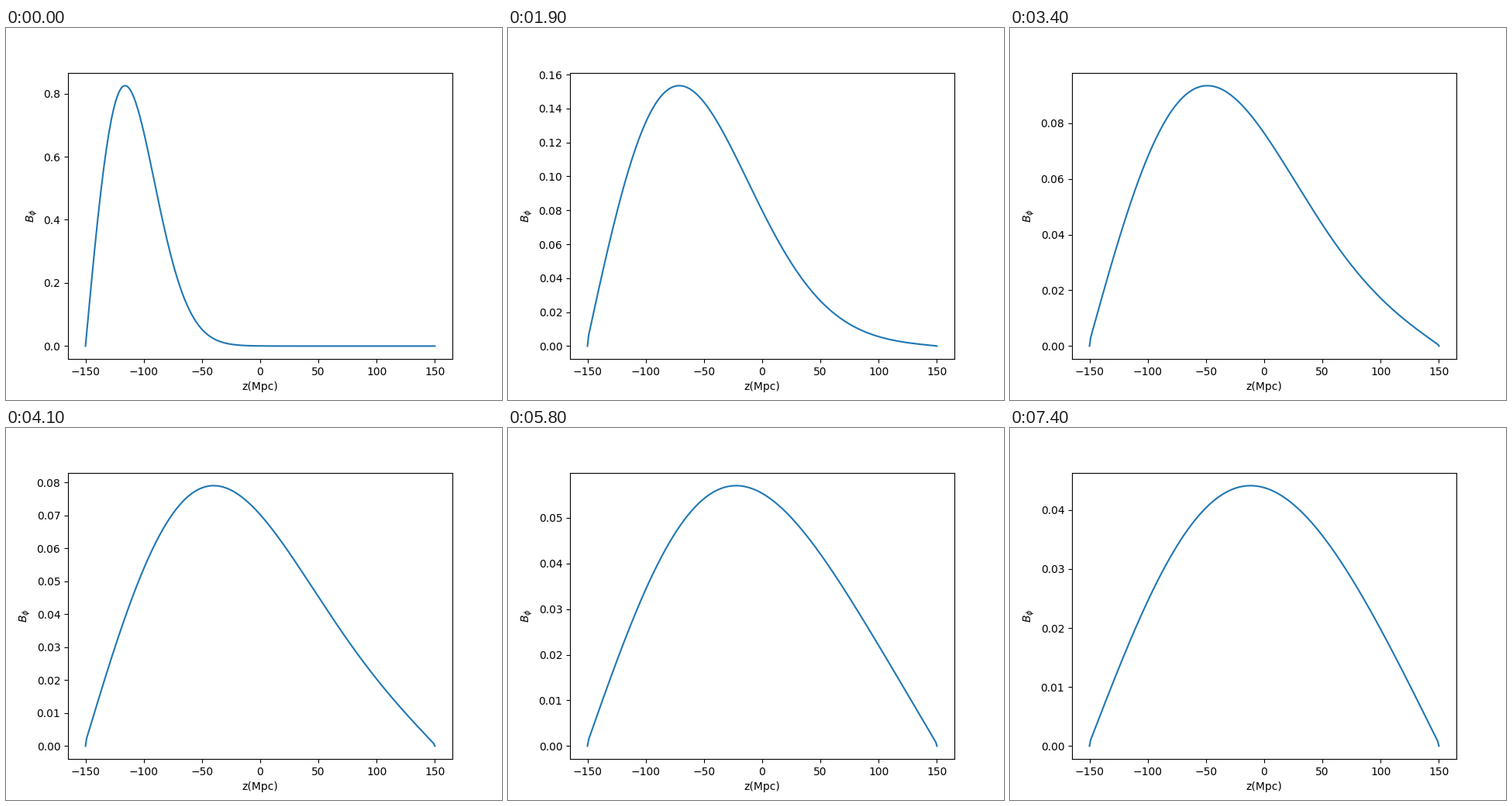
Animation, 640 px wide and 480 px high, one loop 7.5 s. Source, as a matplotlib script:

```python
import numpy as np
import matplotlib.pyplot as plt
from matplotlib.animation import FuncAnimation

FRAMES = 75
INTERVAL = 100      # ms
DIFFUSION = 136.2   # Mpc^2 per frame
SIGMA = 34.0        # width of the starting profile
HALF = 150

z = np.linspace(-HALF, HALF, 2 * HALF + 1)
x = z + HALF
start = x / 25 * np.exp(-x**2 / (2 * SIGMA**2))

# Sine modes vanish one cell outside the grid on both sides.
k = np.arange(1, z.size + 1) * np.pi / (z.size + 1)
modes = np.sin(np.outer(x + 1, k))
weights = 2 / (z.size + 1) * modes.T @ start


def field(step):
    if step == 0:
        return start
    b = modes @ (weights * np.exp(-DIFFUSION * step * k**2))
    b[0] = b[-1] = 0
    return b


fig, ax = plt.subplots(figsize=(6.4, 4.8), dpi=100)
line, = ax.plot(z, start)
ax.set_xlabel("z(Mpc)")
ax.set_ylabel(r"$B_{\phi}$")


def update(step):
    line.set_ydata(field(step))
    ax.relim()
    ax.autoscale_view()
    return line,


anim = FuncAnimation(fig, update, frames=FRAMES, interval=INTERVAL,
                     repeat=True, repeat_delay=0)
plt.show()
```
